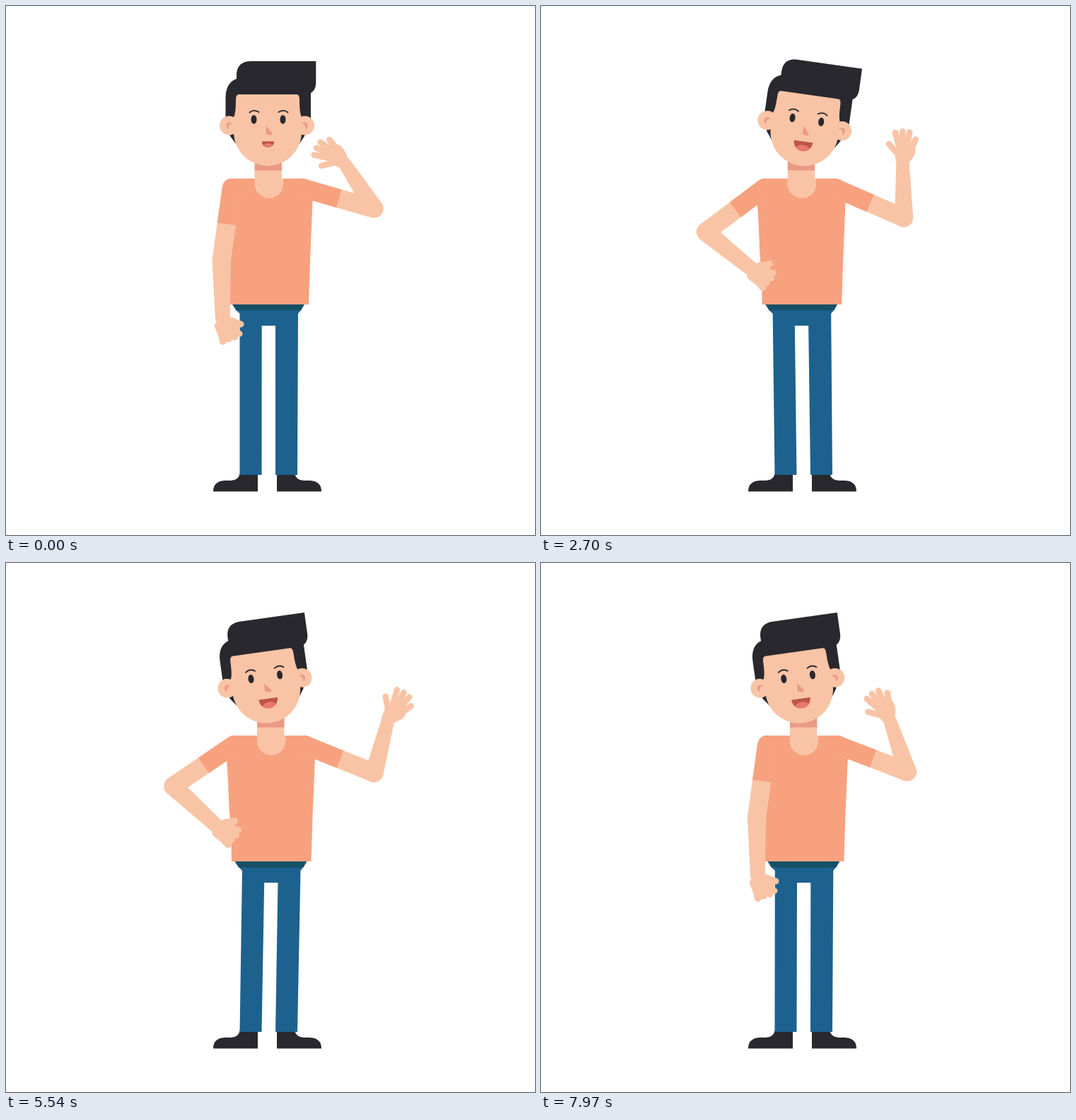
These frames come from a looping animation (748 px wide and 748 px high, 8000 ms). An HTML page with a canvas:

```html
<!DOCTYPE html>
<html lang="en">
<head>
<meta charset="utf-8">
<title>Waving man</title>
<style>
  html, body { margin: 0; width: 100%; height: 100%; overflow: hidden; background: #fff; }
  canvas { display: block; width: 100%; height: 100%; }
</style>
</head>
<body>
<canvas id="stage" width="748" height="748"></canvas>
<script>
const ctx = document.getElementById('stage').getContext('2d');
const LOOP = 8000;
const SKIN = '#f8c4a5', SHIRT = '#f7a17f', SHADE = '#eb9a87', PANTS = '#1d618f',
      BELT = '#165067', DARK = '#29282e', MOUTH = '#bd5549', TONGUE = '#e8796c';

// Turning points of the wave, in 1/30 s: start, right, left, right ...
const TURNS = [0, 11.5, 27, 42, 58.2, 73, 88, 102.3, 116.6, 132.5, 148, 165.5, 182, 198.5, 213, 228, 241.7];

const mix = (a, b, k) => a + (b - a) * k;
const ease = k => (1 - Math.cos(Math.PI * Math.min(1, Math.max(0, k)))) / 2;
const step = (t, from, to) => ease((t - from) / (to - from));

function fillPath(color, d) {
  ctx.fillStyle = color;
  ctx.fill(new Path2D(d));
}

function poly(color, points) {
  ctx.fillStyle = color;
  ctx.beginPath();
  points.forEach(p => ctx.lineTo(p[0], p[1]));
  ctx.fill();
}

function oval(color, x, y, rx, ry = rx) {
  ctx.fillStyle = color;
  ctx.beginPath();
  ctx.ellipse(x, y, rx, ry, 0, 0, Math.PI * 2);
  ctx.fill();
}

function strokePath(color, width, d) {
  ctx.strokeStyle = color;
  ctx.lineWidth = width;
  ctx.lineCap = ctx.lineJoin = 'round';
  ctx.stroke(new Path2D(d));
}

function placed(x, y, degrees, draw) {
  ctx.save();
  ctx.translate(x, y);
  ctx.rotate(degrees * Math.PI / 180);
  draw();
  ctx.restore();
}

// Tapered limb segment between two joints
function limb(color, a, b, ra, rb) {
  const d = Math.hypot(b[0] - a[0], b[1] - a[1]);
  const nx = (a[1] - b[1]) / d, ny = (b[0] - a[0]) / d;
  poly(color, [
    [a[0] + nx * ra, a[1] + ny * ra], [b[0] + nx * rb, b[1] + ny * rb],
    [b[0] - nx * rb, b[1] - ny * rb], [a[0] - nx * ra, a[1] - ny * ra]
  ]);
}

// Elbow position from shoulder, wrist and bone lengths
function elbowOf(s, w, upper, lower) {
  const dx = w[0] - s[0], dy = w[1] - s[1];
  const d = Math.min(Math.hypot(dx, dy), upper + lower);
  const along = (upper * upper - lower * lower + d * d) / (2 * d);
  const out = Math.sqrt(Math.max(0, upper * upper - along * along));
  return [s[0] + (dx * along - dy * out) / d, s[1] + (dy * along + dx * out) / d];
}

// Draws an arm and returns its elbow
function arm(s, w, upper, lower, sleeve, wristR) {
  const e = elbowOf(s, w, upper, lower);
  const k = sleeve / upper;
  const cut = [mix(s[0], e[0], k), mix(s[1], e[1], k)];
  limb(SKIN, s, e, 13.2, 13.2);
  oval(SKIN, e[0], e[1], 13.2);
  limb(SKIN, e, w, 13.2, wristR);
  limb(SHIRT, s, cut, 13.2, 13.2);
  oval(SHIRT, s[0], s[1], 13.2);
  return e;
}

function openHand() {
  fillPath(SKIN, 'M-9 4 Q-11 -4 -12 -11 L-10 -27 L13 -26 Q19 -18 15 -9 Q11 -1 7 3Z');
  strokePath(SKIN, 8.6, 'M-7 -9L-21.5 -23M-6 -18L-14 -40M-1 -18L-4 -42.5M4 -17L6 -42M9 -14L15.5 -33');
}

function fist() {
  fillPath(SKIN, 'M-12 7 Q-10 1 -6 -1 L8 -5 L16 -4 L24 8 L22 16 L14 25 L2 33 Q-1 34 -3 30Z');
  strokePath(SKIN, 9, 'M12 0L25.5 5M14 15L23.5 18.5M10 18L17 23.5M5 20L8.5 26M-1 25L0 29.5');
}

function wristX(t) {
  const f = t * 0.03;
  let i = 0;
  while (i < TURNS.length - 2 && f > TURNS[i + 1]) i++;
  const at = n => n === 0 ? 477 : n % 2 ? 541 : 488;
  return mix(at(i), at(i + 1), step(f, TURNS[i], TURNS[i + 1]));
}

function shoe() {
  fillPath(DARK, 'M356 660 H331 Q329 671 318 671 H309 Q293 672 293 686.5 H356Z');
}

function legs(o) {
  shoe();
  ctx.save();
  ctx.translate(739, 0);
  ctx.scale(-1, 1);
  shoe();
  ctx.restore();
  poly(PANTS, [
    [320 + o, 422], [422 + o, 422], [417 + o, 430], [413 + o, 435],
    [412, 663], [381, 663], [381 + o, 452], [361.7 + o, 452],
    [361.5, 663], [330.5, 663], [330.5 + o, 435], [325.5 + o, 430]
  ]);
  poly(BELT, [[320 + o, 421], [422 + o, 421], [417 + o, 430.5], [325.5 + o, 430.5]]);
}

function torso() {
  fillPath(SHIRT, 'M319 244 H419 Q425 244 430 248 L433.5 276 Q430 350 428 422 H315.5 ' +
    'Q315 385 312 345 Q311 310 308.5 276Z');
  fillPath(SKIN, 'M351.7 215 H390 V244 H392 V251.5 A20.3 20.3 0 0 1 351.4 251.5Z');
  fillPath(SHADE, 'M351.7 215 H390 V232.5 H351.7Z');
}

function mouth(open) {
  ctx.save();
  ctx.translate(370.5, 191.2);
  ctx.scale(mix(0.66, 1, open), mix(0.62, 1, open));
  const lips = new Path2D('M-13.5 0 H13.5 C13.5 8 8 14 0 14 C-8 14 -13.5 8 -13.5 0Z');
  ctx.clip(lips);
  ctx.fillStyle = MOUTH;
  ctx.fill(lips);
  oval(TONGUE, 0.5, 13, 11, 8);
  ctx.restore();
}

function head(open) {
  fillPath(DARK, 'M310.5 158 V130 C310.5 114 317 106 326 103 V97 Q326.5 79 345 78 H438.3 V109 ' +
    'Q438 119 431 123 V158 L422 184 L414 196 H326 L317 184Z');
  oval(SKIN, 315.5, 169, 13.5);
  oval(SKIN, 422.5, 169, 13.5);
  fillPath(SKIN, 'M322 157 Q325 152 325 133 Q325 125 329 125 H411 Q415 125 415 133 ' +
    'Q415 152 418 157 V178 A48 48 0 0 1 322 178Z');
  fillPath(SHADE, 'M321 166 Q313 162 311.5 168 Q311 172 314.5 174.5 Q313.5 166 321 166Z');
  fillPath(SHADE, 'M417 166 Q425 162 426.5 168 Q427 172 423.5 174.5 Q424.5 166 417 166Z');
  oval(DARK, 350.5, 160.5, 4, 6.2);
  oval(DARK, 391.5, 160.5, 4, 6.2);
  strokePath(DARK, 1.9, 'M344.5 150.5 Q350 145.5 357.5 150M385.5 150 Q393 145.5 398.5 150.5');
  fillPath(SHADE, 'M368 169.5 L376.5 180 Q377 182.5 374 182.5 Q369 182.5 367.5 180Z');
  mouth(open);
}

function draw(t) {
  ctx.fillStyle = '#fff';
  ctx.fillRect(0, 0, 748, 748);

  const sway = -3.5 * Math.sin(Math.PI * t / 1000);
  const tilt = 8 * step(t, 1000, 1550) - 16 * step(t, 4130, 4745);
  const hip = step(t, 1000, 1600) - step(t, 7100, 7680);
  const open = step(t, 0, 300);

  legs(sway);
  placed(sway, 0, 0, torso);

  const right = [wristX(t), 220];
  const elbow = arm([418 + sway, 257], right, 106.7, 79.5, 55, 9);
  // The hand swings about twice as far as the forearm.
  const lean = Math.atan2(right[0] - elbow[0], elbow[1] - right[1]) * 180 / Math.PI;
  placed(right[0], right[1], 7 + 1.95 * lean, openHand);

  const left = [mix(306.5, 299, hip), mix(445, 373, hip)];
  arm([319 + sway, 257], left, 104, 85, 51.8, 10.3);
  placed(left[0], left[1], -30 * hip, fist);

  placed(371 + sway, 216, tilt, () => {
    ctx.translate(-371, -216);
    head(open);
  });
}

function tick() {
  draw(performance.now() % LOOP);
  requestAnimationFrame(tick);
}
tick();
</script>
</body>
</html>
```
